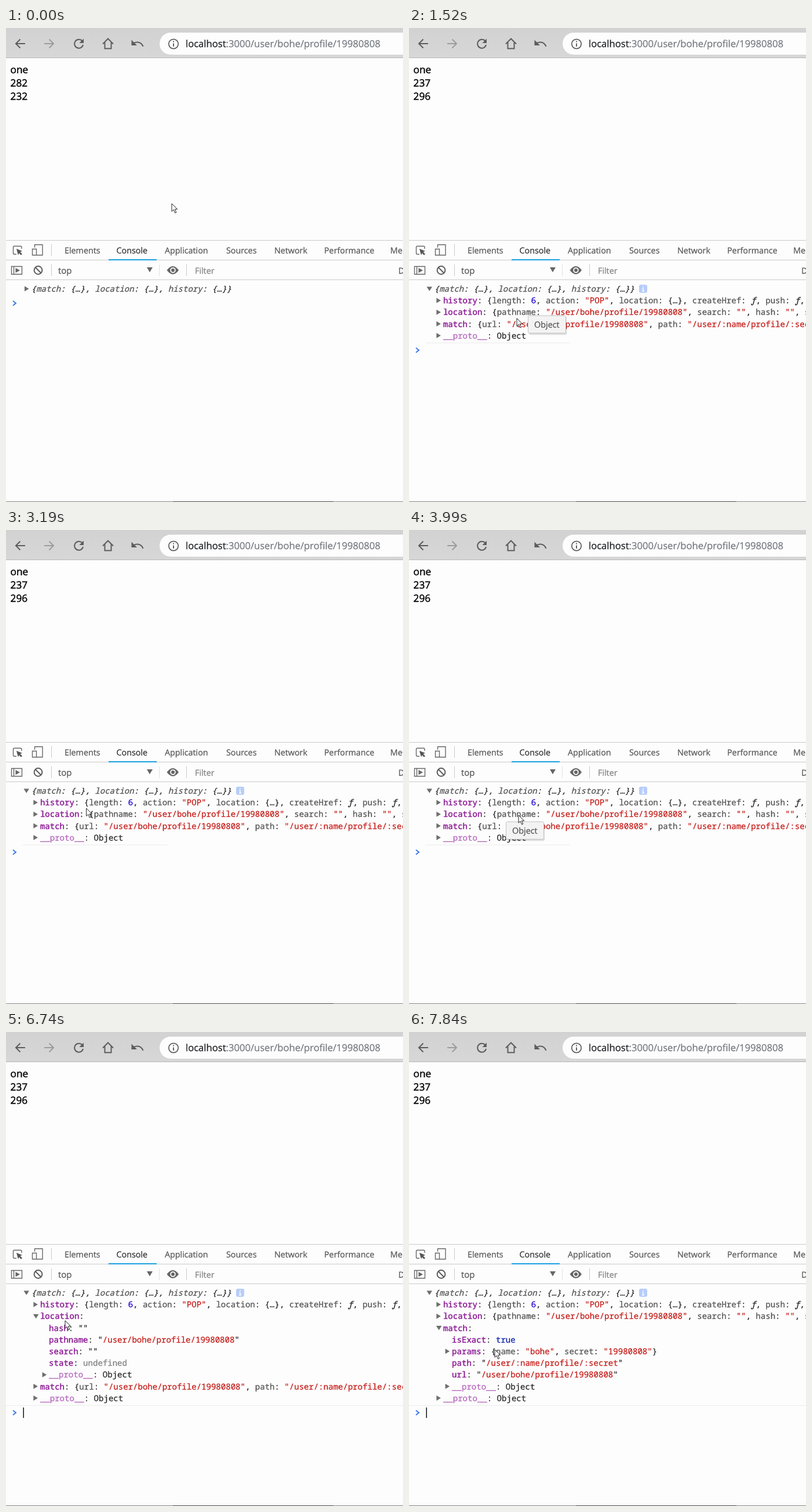
Recreate the animation shown at these times as an HTML page. Size 685 px wide and 818 px high, loop 8000 ms.

```html
<!DOCTYPE html>
<html lang="en">
<head>
<meta charset="utf-8">
<title>Router props in the console</title>
<style>
html, body { margin: 0; width: 100%; height: 100%; overflow: hidden; background: #fdfdfd; }
svg { display: block; }
text { font-family: "Open Sans", "Noto Sans", sans-serif; white-space: pre; text-rendering: geometricPrecision; }
text, tspan { fill: currentColor; stroke: currentColor; stroke-width: .25px; }
.tab { font-size: 14.3px; color: #555; }
.page { font-size: 17.3px; color: #000; stroke-width: .4px; }
.url { font-size: 16.6px; color: #757a80; }
.mono { font: 14.05px "Noto Sans Mono", "DejaVu Sans Mono", monospace; color: #262626; }
.head { font-style: italic; }
.key { color: #881391; stroke-width: .4px; }
.proto { color: #b565bc; }
.str { color: #c41a16; }
.prop { color: #505050; }
.num { color: #1c00cf; }
.bool { color: #0d22aa; }
.undef { color: #808080; }
.func { font-style: italic; color: #222; }
.line { fill: none; stroke: #5c5c5c; stroke-width: 2; }
.thin { fill: none; stroke: #666; stroke-width: 1.4; }
.rule { fill: none; stroke: #cacaca; stroke-width: 1; }
</style>
</head>
<body>
<svg id="stage" width="685" height="818" viewBox="0 0 685 818">
  <defs>
    <linearGradient id="bar" x2="0" y2="1">
      <stop offset="0" stop-color="#d2d2d2"/><stop offset="1" stop-color="#d7d7d7"/>
    </linearGradient>
  </defs>
  <rect width="685" height="818" fill="#fdfdfd"/>

  <!-- browser bar -->
  <rect width="685" height="52" fill="url(#bar)"/>
  <path d="M0 51.5H685" stroke="#b8b8b8"/>
  <rect x="265" y="8" width="460" height="38" rx="19" fill="#fdfdfd"/>
  <path class="line" d="M33 27H17M24.5 19.5L17 27L24.5 34.5"/>
  <path class="line" style="stroke:#9c9c9c" d="M66 27H82M74.5 19.5L82 27L74.5 34.5"/>
  <path class="line" d="M131.5 22.5A7.5 7.5 0 1 0 133 29"/>
  <path d="M134 18.5V26H126.5Z" fill="#5c5c5c"/>
  <path class="line" d="M167 27.5L176 18.5L185 27.5M170.5 25V35.5H181.5V25"/>
  <path class="line" d="M219 27C225 22.5 233.5 24 236.5 32"/>
  <path d="M216.5 20.5V30H226Z" fill="#5c5c5c"/>
  <circle class="line" cx="289" cy="27.5" r="8.2" style="stroke-width:1.7"/>
  <path class="line" d="M289 26.5V32M289 22.5V24.5" style="stroke-width:1.9"/>
  <text class="url" x="310" y="33"><tspan style="color:#1d1f22">localhost</tspan>:3000/user/bohe/profile/19980808</text>

  <!-- page -->
  <text class="page" x="7.5" y="78">one</text>
  <text class="page" x="7.5" y="101" id="first"></text>
  <text class="page" x="7.5" y="123.5" id="second"></text>

  <!-- developer tools -->
  <path class="rule" d="M0 366.5H685M0 400.5H685M0 434.5H685M78.5 373V393M78.5 408V428M311.5 408V428"/>
  <path class="rule" d="M264.5 408V428" style="stroke:#e2e2e2"/>
  <rect x="177" y="399" width="83" height="2" fill="#1a9fe0"/>
  <path class="thin" d="M18 390.5H14.5Q12.5 390.5 12.5 388.5V378.5Q12.5 376.5 14.5 376.5H25Q27 376.5 27 378.5V381"/>
  <path d="M18 381L28 385L24.5 386.5L28 390L26 392L22.5 388.5L21 392Z" fill="#555"/>
  <path class="thin" d="M49.5 379V374H63V392H53M45.5 381.5H52.5V392H45.5Z"/>
  <path class="thin" d="M9.5 411.5H27.5V425H9.5ZM13.5 411.5V425"/>
  <path d="M16.5 414V422.5L24 418.25Z" fill="#666"/>
  <circle class="line" cx="55.5" cy="418" r="6.9"/>
  <path class="line" d="M50.5 413L60.5 423"/>
  <path d="M243 413H253L248 421.5Z" fill="#666"/>
  <path d="M277.5 418Q288 404 298 418Q288 432 277.5 418Z" fill="#666"/>
  <circle cx="288" cy="418" r="3.9" fill="#666" stroke="#fdfdfd" stroke-width="1.8"/>
  <g id="tabs"></g>
  <text class="tab" x="90" y="423.5" style="font-size:15px">top</text>
  <text class="tab" x="326" y="424" style="color:#808080">Filter</text>
  <text class="tab" x="677" y="423.5">D</text>

  <g id="trees"></g>
  <rect id="caret" x="29.5" width="1.5" height="18" fill="#111"/>

  <path d="M0 817.5H685" stroke="#858585"/>
  <path d="M288 817.5H565" stroke="#444"/>

  <g id="tip">
    <rect x="2" y="2.5" width="65" height="31" rx="2" fill="#000" opacity=".13"/>
    <rect x=".5" y=".5" width="65" height="30" rx="2" fill="#f3f3f3" stroke="#c4c4c4"/>
    <text class="tab" x="11" y="20.5" id="tipText" style="font-size:14.4px"></text>
  </g>
  <path id="cursor" d="M0 0V13.5L3.2 10.6L5.6 16.2L7.8 15.2L5.4 9.8H9.7Z" fill="#fff" stroke="#222"/>
</svg>
<script>
const $ = id => document.getElementById(id);
const LOOP = 8000, TOP = 450, PITCH = 20.2;

const TABS = { Elements: 101, Console: 190.5, Application: 274, Sources: 380, Network: 463, Performance: 549, Me: 663 };
$('tabs').innerHTML = Object.entries(TABS).map(([name, x]) =>
  `<text class="tab" x="${x}" y="388.5"${name === 'Console' ? ' style="color:#303030"' : ''}>${name}</text>`).join('');

// Console rows: [depth, arrow (0 none, 1 closed, 2 open), text]
const PATH = '"/user/bohe/profile/19980808"';
const ROUTE = '"/user/:name/profile/:secret"';
const HEAD = '{match: {…}, location: {…}, history: {…}}';
const proto = depth => [depth, 1, '__proto__: Object'];
const historyRow = [1, 1, 'history: {length: 6, action: "POP", location: {…}, createHref: ƒ, push: ƒ, replace: ƒ'];
const locationRow = [1, 1, `location: {pathname: ${PATH}, search: "", hash: "", state: undefined`];
const matchRow = [1, 1, `match: {url: ${PATH}, path: ${ROUTE}, isExact: true`];
const locationOpen = [[1, 2, 'location:'], [2, 0, 'hash: ""'], [2, 0, `pathname: ${PATH}`],
  [2, 0, 'search: ""'], [2, 0, 'state: undefined'], proto(2)];
const matchOpen = [[1, 2, 'match:'], [2, 0, 'isExact: true'],
  [2, 1, 'params: {name: "bohe", secret: "19980808"}'], [2, 0, `path: ${ROUTE}`], [2, 0, `url: ${PATH}`], proto(2)];

const TREES = {
  closed: [],
  open: [historyRow, locationRow, matchRow, proto(1)],
  location: [historyRow, ...locationOpen, matchRow, proto(1)],
  match: [historyRow, locationRow, ...matchOpen, proto(1)],
};

const span = (cls, text) => `<tspan class="${cls}">${text}</tspan>`;
const TOKEN = /("[^"]*")|(\w+(?=:))|(\b\d+\b)|(true)|(undefined)|(ƒ)|[^"\wƒ]+|\w+/g;
const CLASSES = ['str', 'prop', 'num', 'bool', 'undef', 'func'];

function paint(text, plainQuotes) {
  return text.replace(TOKEN, (token, ...groups) => {
    const cls = CLASSES.find((_, i) => groups[i] !== undefined);
    if (cls === 'str' && plainQuotes) return `"${span('str', token.slice(1, -1))}"`;
    return cls ? span(cls, token) : token;
  });
}

function arrow(x, y, kind) {
  if (!kind) return '';
  const shape = kind === 1 ? 'M0 -4.5V4.5L7.5 0Z' : 'M-.5 -3.5H9L4.25 4Z';
  return `<path d="${shape}" transform="translate(${x} ${y})" fill="#6e6e6e"/>`;
}

function row([depth, kind, text], i) {
  const y = TOP + PITCH * (i + 1), x = 43.7 + 15.2 * depth;
  const cut = text.indexOf(':'), name = text.slice(0, cut);
  const key = span(name === '__proto__' ? 'proto' : 'key', name);
  return arrow(x - 11.5, y, kind) +
    `<text class="mono" x="${x}" y="${Math.round(y + 5)}">${key}${paint(text.slice(cut), !kind)}</text>`;
}

const promptY = name => Math.round(TOP + PITCH * TREES[name].length + 25);

function tree(name) {
  const open = name !== 'closed', end = promptY(name);
  const badge = `<rect x="397" y="443" width="14" height="14" rx="3" fill="#b7cdfa"/>
    <path d="M404 449V454M402.5 449.5H404M402 454H406M404 445.5V447.5" stroke="#fff" stroke-width="1.5"/>`;
  const [left, right] = name === 'open' ? [29, 278] : [0, 685];
  const divider = `<path d="M${left} ${end - 12.5}H${right}" stroke="#ececec"/>`;
  return `<g id="tree-${name}">${arrow(open ? 31 : 32, TOP, open ? 2 : 1)}
    <text class="mono head" x="43.7" y="${TOP + 5}">${paint(HEAD)}</text>
    ${open ? badge + divider : ''}${TREES[name].map(row).join('')}
    <path d="M12 ${end - 4}L17 ${end}L12 ${end + 4}" fill="none" stroke="#3b78e7" stroke-width="1.9"/></g>`;
}
$('trees').innerHTML = Object.keys(TREES).map(tree).join('');

// Timelines: hard steps are [time, value...]; the cursor glides between its stops.
const PAGE = [[0, 282, 232], [600, 237, 296]];
const VIEW = [[0, 'closed'], [850, 'open'], [5650, 'location'], [7010, 'open'], [7430, 'match']];
const CARET = [[0, 0], [850, 1], [1280, 0], [1650, 1], [2490, 0], [2770, 1], [3190, 0], [3590, 1], [3870, 0],
  [4260, 1], [4670, 0], [5100, 1], [5500, 0], [5650, 1], [6080, 0], [6500, 1], [6890, 0], [7010, 1], [7280, 0], [7430, 1]];
const TIP = [[0, 0], [1280, 1, 'Object', 205, 496], [1800, 0], [2220, 1, 'history', 111, 494], [2770, 0],
  [3870, 1, 'Object', 167, 503], [5500, .5, 'Object', 167, 503], [5650, 0]];
const CURSOR = [[0, 286, 303], [150, 286, 303], [750, 42, 450], [870, 42, 450], [1130, 191, 475], [1280, 191, 475],
  [1500, 186, 501], [1670, 186, 501], [1850, 150, 478], [2070, 97, 473], [2370, 97, 473], [2490, 95, 472],
  [2770, 95, 472], [3590, 180, 488], [3870, 189, 492], [5490, 189, 492], [5500, 213, 493], [6080, 213, 493],
  [6700, 102, 498], [6890, 102, 498], [7130, 92, 506], [7430, 92, 506], [7820, 148, 548], [8000, 148, 548]];

const indexAt = (table, t) => table.findLastIndex(step => step[0] <= t);
const stepAt = (table, t) => table[indexAt(table, t)];

function between(table, t) {
  const i = indexAt(table, t), a = table[i], b = table[i + 1] || a;
  const k = b === a ? 0 : (t - a[0]) / (b[0] - a[0]);
  return [1, 2].map(j => a[j] + (b[j] - a[j]) * k);
}

function draw(t) {
  const [, first, second] = stepAt(PAGE, t);
  $('first').textContent = first;
  $('second').textContent = second;

  const view = stepAt(VIEW, t)[1];
  for (const name in TREES) $('tree-' + name).style.display = name === view ? '' : 'none';
  $('caret').setAttribute('y', promptY(view) - 9);
  $('caret').style.opacity = stepAt(CARET, t)[1];

  const [, opacity, label = '', x = 0, y = 0] = stepAt(TIP, t);
  $('tip').style.opacity = opacity;
  $('tip').setAttribute('transform', `translate(${x} ${y})`);
  $('tipText').textContent = label;
  $('cursor').setAttribute('transform', `translate(${between(CURSOR, t).join(' ')})`);
}

const start = performance.now();
function tick() {
  draw((performance.now() - start) % LOOP);
  requestAnimationFrame(tick);
}
tick();
</script>
</body>
</html>
```
